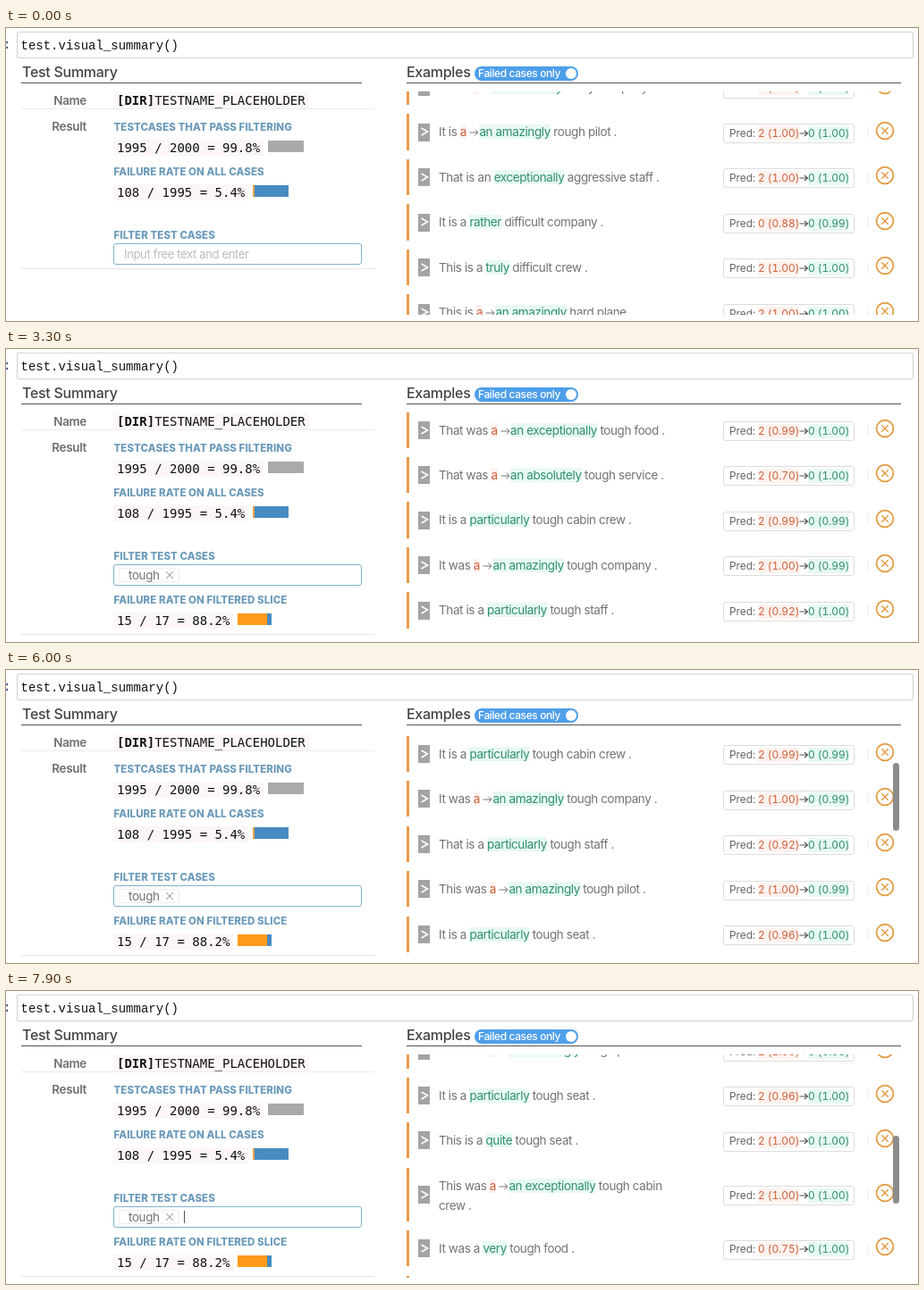
Animation of 1020 by 328 pixels, one loop 8 s. Source, as an HTML page:

```html
<!DOCTYPE html>
<html lang="en">
<head>
<meta charset="utf-8">
<title>Test summary</title>
<style>
html, body { margin: 0; width: 100%; height: 100%; overflow: hidden; background: #fff; }
#stage { position: relative; width: 1020px; height: 328px; overflow: hidden;
  font: 13.5px/20px Inter, "Open Sans", sans-serif; letter-spacing: -.4px; color: #737373; }
#stage div { position: absolute; box-sizing: border-box; white-space: pre; }
#stage .code { font: 14px/18px "Liberation Mono", monospace; letter-spacing: 0; color: #111; }
#stage .tint { font-family: "DejaVu Sans Mono", monospace; background: #fcf6f7; padding: 0 4px; }
#stage .title { font-size: 16px; font-weight: 500; letter-spacing: -.28px; color: #444; }
#stage .label { font-weight: 600; letter-spacing: -.34px; color: #6e6e6e; width: 60px; text-align: right; }
#stage .head { font-size: 11.5px; font-weight: 800; letter-spacing: .08px; color: #6b9aba; }
#stage .switch { background: #4e9fe9; border-radius: 8px; color: #fff; font-size: 12px; font-weight: 500;
  line-height: 15px; letter-spacing: -.4px; padding-left: 4px; }
#stage .hint { font-size: 13px; letter-spacing: -.34px; color: #bbb; }
#stage .pill { border: 1px solid #ddd; border-radius: 3px; }
#stage .pred { font-size: 12px; line-height: 16px; letter-spacing: -.08px; font-feature-settings: "tnum"; color: #666; }
#stage .old { color: #d0603a; background: #fdf2ee; }
#stage .new { color: #2f8f70; background: #e8f9f3; }
svg { position: absolute; overflow: visible; fill: none; }
svg.arrow { position: static; vertical-align: -1px; }
</style>
</head>
<body>
<div id="stage"></div>
<script>
const stage = document.getElementById('stage');
const LOOP = 8000, PITCH = 50.45, ENTER = 1800;

function box(parent, x, y, w, h, style = '', cls = '') {
  const el = document.createElement('div');
  el.className = cls;
  el.style.cssText = `left:${x}px;top:${y}px;width:${w}px;height:${h}px;${style}`;
  parent.append(el);
  return el;
}

// Text whose line is centred vertically on y
function text(parent, x, y, html, cls = '') {
  const el = document.createElement('div');
  el.className = cls;
  el.innerHTML = html;
  el.style.left = x + 'px';
  parent.append(el);
  el.style.top = y - parseFloat(getComputedStyle(el).lineHeight) / 2 + 'px';
  return el;
}

const fill = (parent, x, y, w, h, color) => box(parent, x, y, w, h, 'background:' + color);

function drawing(parent, x, y, paths) {
  const holder = box(parent, x, y, 0, 0);
  holder.innerHTML = `<svg width="1" height="1">${paths}</svg>`;
}

const ARROW = '<svg class="arrow" width="11" height="10"><path d="M.5 5h9.5M6.5 1.8 10 5 6.5 8.2" stroke="#777"/></svg>';

// [word] is removed, {words} are inserted
const markup = s => s
  .replace(/\[(.+?)\] /g, `<span class="old">$1</span> ${ARROW}`)
  .replace(/\{(.+?)\}/g, '<span class="new">$1</span>');

function makeList(rows) {
  const list = box(stage, 0, 0, 1020, 0);
  let top = 0;
  for (const [sentence, before, after] of rows) {
    const lines = sentence.split('\n');
    const extra = (lines.length - 1) * 20, mid = top + extra / 2;
    fill(list, 448, top, 3, 40.3 + extra, '#e99b4c');
    fill(list, 461, mid + 10.3, 13, 20, '#a3a3a3');
    drawing(list, 467.5, mid + 20, '<path d="M-3.5-4 3.5 0-3.5 4" stroke="#fff" stroke-width="1.6"/>');
    lines.forEach((line, i) => text(list, 484, top + 20 + i * 22, markup(line)));
    box(list, 802, mid + 10.5, 147, 22, '', 'pill');
    const y = mid + 21.3;
    text(list, 809, y, 'Pred:', 'pred');
    text(list, 841, y, before, 'pred old');
    drawing(list, 886.5, y, '<path d="M.5 0h9M6-3 9.5 0 6 3" stroke="#555" stroke-width="1.2"/>');
    text(list, 897, y, after, 'pred new');
    fill(list, 964, mid + 14, 1, 12, '#eee');
    drawing(list, 983, mid + 18.3,
      '<circle r="9.4" stroke="#e3993f" stroke-width="1.7"/><path d="M-3.7-3.7 3.7 3.7M3.7-3.7-3.7 3.7" stroke="#e3993f" stroke-width="1.4"/>');
    top += PITCH + extra;
  }
  return list;
}

const allCases = [
  ['It was [a] {an extremely} nasty company .', '2 (1.00)', '0 (0.99)'],
  ['It is [a] {an amazingly} rough pilot .', '2 (1.00)', '0 (1.00)'],
  ['That is an {exceptionally} aggressive staff .', '2 (1.00)', '0 (1.00)'],
  ['It is a {rather} difficult company .', '0 (0.88)', '0 (0.99)'],
  ['This is a {truly} difficult crew .', '2 (1.00)', '0 (1.00)'],
  ['This is [a] {an amazingly} hard plane .', '2 (1.00)', '0 (1.00)']
];
const toughCases = [
  ['That was [a] {an exceptionally} tough food .', '2 (0.99)', '0 (1.00)'],
  ['That was [a] {an absolutely} tough service .', '2 (0.70)', '0 (1.00)'],
  ['It is a {particularly} tough cabin crew .', '2 (0.99)', '0 (0.99)'],
  ['It was [a] {an amazingly} tough company .', '2 (1.00)', '0 (0.99)'],
  ['That is a {particularly} tough staff .', '2 (0.92)', '0 (1.00)'],
  ['This was [a] {an amazingly} tough pilot .', '2 (1.00)', '0 (0.99)'],
  ['It is a {particularly} tough seat .', '2 (0.96)', '0 (1.00)'],
  ['This is a {quite} tough seat .', '2 (1.00)', '0 (1.00)'],
  ['This was [a] {an exceptionally} tough cabin\ncrew .', '2 (1.00)', '0 (1.00)'],
  ['It was a {very} tough food .', '0 (0.75)', '0 (1.00)'],
  ['That is a {very} tough crew .', '2 (1.00)', '0 (1.00)']
];

// Example lists, clipped to their scroll area
const view = box(stage, 0, 70.5, 1020, 250.5, 'overflow:hidden');
const listAll = makeList(allCases), listTough = makeList(toughCases);
view.append(listAll, listTough);
listAll.style.top = '-24.5px';
const thumb = box(stage, 992, 0, 7, 76, 'background:#8c8c8c;border-radius:4px');

// Notebook cell
text(stage, -3, 19, ':', 'code').style.color = '#303f7f';
box(stage, 12, 4, 1003, 30, 'border:1px solid #d2d2d2;border-radius:2px');
text(stage, 16.5, 20, 'test.visual_summary()', 'code');

// Headings
text(stage, 18, 49, 'Test Summary', 'title');
fill(stage, 17, 61, 381, 1, '#555');
text(stage, 448, 49, 'Examples', 'title');
fill(stage, 448, 61, 553, 1, '#555');
box(stage, 524, 43, 116, 16, '', 'switch').textContent = 'Failed cases only';
box(stage, 626, 45, 12, 12, 'background:#fff;border-radius:50%');

// Summary panel
text(stage, 30, 81, 'Name', 'label');
text(stage, 120, 81, '<b>[DIR]</b>TESTNAME_PLACEHOLDER', 'code tint');
fill(stage, 17, 90, 395, 1, '#ebebeb');
text(stage, 30, 110, 'Result', 'label');
text(stage, 120.5, 111, 'TESTCASES THAT PASS FILTERING', 'head');
text(stage, 120, 134, '1995 / 2000 = 99.8%', 'code tint');
fill(stage, 293, 126, 40, 13, '#aaa');
text(stage, 120.5, 161, 'FAILURE RATE ON ALL CASES', 'head');
text(stage, 120, 184, '108 / 1995 = 5.4%', 'code tint');
fill(stage, 276, 176, 40, 13, '#488bc2');
fill(stage, 276, 176, 2, 13, '#e8a04c');
text(stage, 120.5, 232, 'FILTER TEST CASES', 'head');
box(stage, 120, 241, 278, 24, 'border:1px solid #82b1cb;border-radius:3px');
const panelEnd = fill(stage, 17, 0, 395, 1, '#e6e6e6');

// Filter field
const hint = text(stage, 132, 253, 'Input free text and enter', 'hint');
const typed = text(stage, 127, 253, '');
const caret = fill(stage, 0, 246, 1, 14, '#555');

// Parts that appear once the filter is applied
const slice = box(stage, 0, 0, 0, 0);
box(slice, 126, 245, 68, 16, 'border:1px solid #eee;border-radius:2px');
text(slice, 137, 253, 'tough');
drawing(slice, 183, 253, '<path d="M-4-4 4 4M4-4-4 4" stroke="#999"/>');
text(slice, 120.5, 281, 'FAILURE RATE ON FILTERED SLICE', 'head');
text(slice, 120, 304, '15 / 17 = 88.2%', 'code tint');
fill(slice, 259, 296, 33, 13, '#ff9a1c');
fill(slice, 292, 296, 5, 13, '#488bc2');

const keyTimes = [200, 600, 700, 900, 1100];
const scrollKeys = [[4300, 0], [4800, 38.5], [5700, 58.8], [6600, 175], [7900, 276.5]];

function scrollAt(t) {
  for (let i = 1; i < scrollKeys.length; i++) {
    const [t0, a] = scrollKeys[i - 1], [t1, b] = scrollKeys[i];
    if (t < t1) return a + (b - a) * Math.max(0, (t - t0) / (t1 - t0));
  }
  return scrollKeys.at(-1)[1];
}

const show = (el, on) => { el.style.visibility = on ? 'visible' : 'hidden'; };

function draw(now) {
  const t = now % LOOP, entered = t >= ENTER;
  const count = keyTimes.filter(k => t >= k).length;
  const scroll = scrollAt(t);
  typed.textContent = entered ? '' : 'tough'.slice(0, count);
  show(hint, !count);
  show(slice, entered);
  show(listAll, !entered);
  show(listTough, entered);
  show(thumb, t > 4300);
  show(caret, t % 1000 >= 450 || (count && t < 1450));
  caret.style.left = (entered ? 199 : 127 + typed.offsetWidth) + 'px';
  panelEnd.style.top = (entered ? 319 : 269) + 'px';
  listTough.style.top = -scroll + 'px';
  thumb.style.top = 72.5 + scroll * .3235 + 'px';
  requestAnimationFrame(() => draw(performance.now()));
}
draw(0);
</script>
</body>
</html>
```
